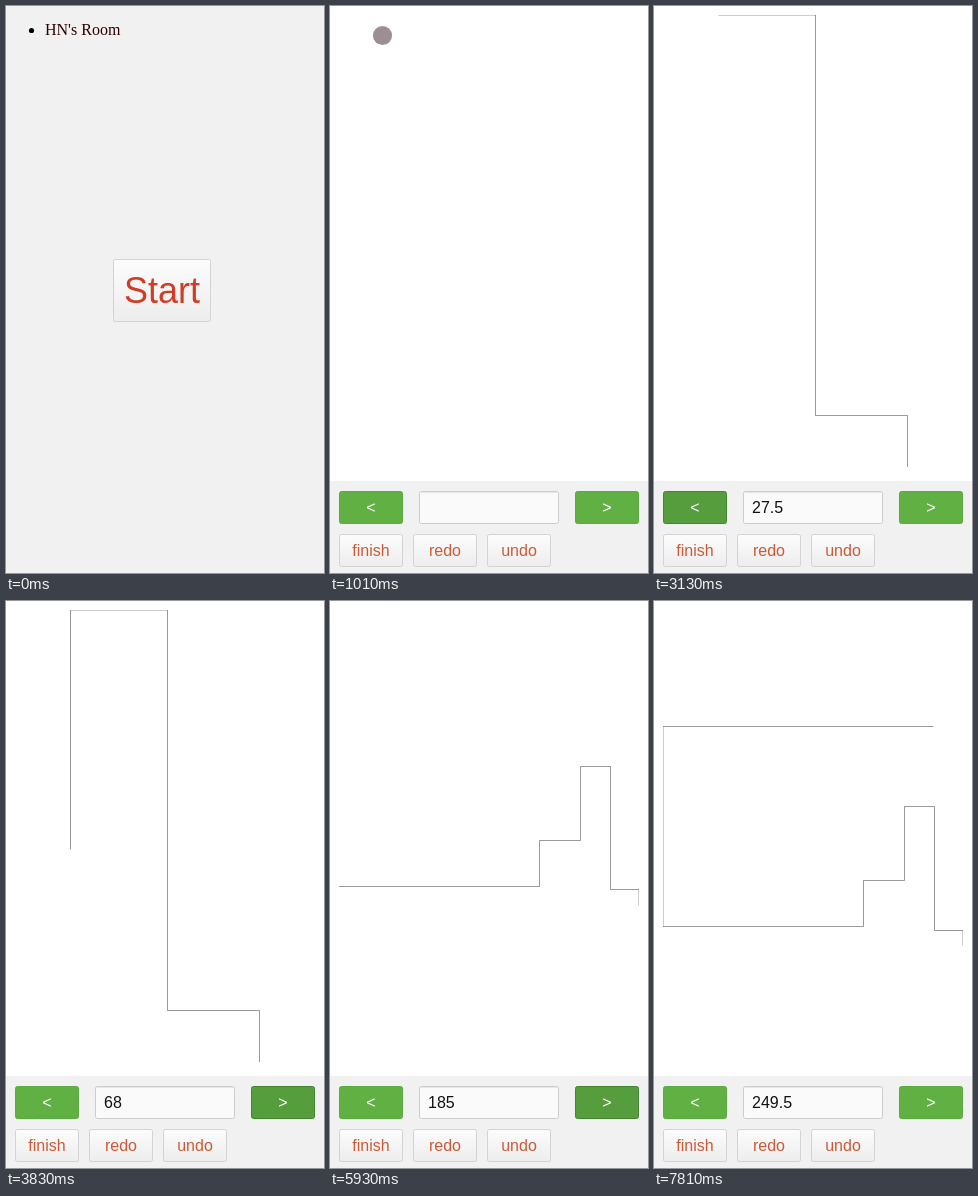
Animation of 318 by 567 pixels, one loop 8 s. Source, as an HTML page:

```html
<!DOCTYPE html>
<html lang="en">
<head>
<meta charset="utf-8">
<title>Wall plan</title>
<style>
  html, body { margin: 0; height: 100%; overflow: hidden; background: #fff; }
  body > svg { display: block; width: 100vw; height: 100vh; }
  text { font: 16px "Liberation Sans", Arial, sans-serif; }
  .mid { text-anchor: middle; }
  .link { font-family: "Liberation Serif", Times, serif; fill: #300000; }
  .light rect { fill: url(#shade); stroke: #d3d3d3; }
  .light text { fill: #cb5a37; }
  .light .big { font-size: 36px; fill: #d03c25; }
  .turn rect { fill: #60b044; stroke: #5cab41; }
  .turn text { fill: #fff; }
  .turn.down rect { fill: #569d3d; stroke: #45852f; }
  #walls { fill: none; stroke: #000; stroke-width: .4; }
</style>
</head>
<body>
<svg viewBox="0 0 318 567">
  <defs>
    <linearGradient id="shade" x2="0" y2="1">
      <stop stop-color="#fcfcfc"/><stop offset="1" stop-color="#ededed"/>
    </linearGradient>
  </defs>
  <g id="home">
    <rect width="318" height="567" fill="#f1f1f1"/>
    <circle cx="25.5" cy="24.5" r="2.6"/>
    <text class="link" x="39" y="29">HN's Room</text>
    <g class="light">
      <rect x="107.5" y="253.5" width="97" height="62" rx="2"/>
      <text class="mid big" x="156" y="297">Start</text>
    </g>
  </g>
  <g id="plan">
    <rect width="318" height="567" fill="#fff"/>
    <svg x="9" y="9" width="300" height="452"><polyline id="walls"/></svg>
    <rect y="475" width="318" height="92" fill="#f1f1f1"/>
    <rect x="89.5" y="485.5" width="139" height="32" rx="2" fill="#fafafa" stroke="#ccc"/>
    <path d="M91 486.5h136" stroke="#e6e6e6"/>
    <text id="value" x="98" y="507" fill="#111"></text>
  </g>
  <circle id="touch" r="9.6" fill="#3c1e28" fill-opacity=".5"/>
</svg>
<script>
const $ = id => document.getElementById(id);

function addButton(x, y, label, kind) {
  const g = document.createElementNS('http://www.w3.org/2000/svg', 'g');
  g.setAttribute('class', kind);
  g.innerHTML = `<rect x="${x + .5}" y="${y + .5}" width="63" height="32" rx="2"/>
    <text class="mid" x="${x + 32}" y="${y + 22}"></text>`;
  g.lastElementChild.textContent = label;
  $('plan').append(g);
  return g;
}
const left = addButton(9, 485, '<', 'turn');
const right = addButton(245, 485, '>', 'turn');
['finish', 'redo', 'undo'].forEach((s, i) => addButton(9 + 74 * i, 528, s, 'light'));

const LOOP = 8000, PLAN_AT = 1010, TOUCH_END = 1090;
const W = 300, H = 452;

// drawn at, button released at, wall length, turn after it, button pressed at
const steps = [
  [1170, 1550, 14.5, '<'],
  [1790, 2270, 26.3, '>', 1550],
  [2410, 2970, 114, '<'],
  [3130, 3670, 27.5, '<'],
  [3830, 4370, 68, '>'],
  [4530, 5070, 38, '<'],
  [5230, 5770, 42.5, '>'],
  [5930, 6470, 185, '>'],
  [6630, 7190, 184.5, '>'],
  [7350, 7810, 249.5, '<']
].map(([at, up, len, turn, down = at]) => ({ at, up, len, turn, down }));

// Crisp pixel centres inside, half-clipped lines on the border
const snap = (v, max) => v < .01 ? 0 : v > max - .01 ? max : Math.floor(v) + .5;

function fitWalls(walls) {
  if (!walls.length) return '';
  let x = 0, y = 0, dx = 0, dy = -1;
  const pts = [[0, 0]];
  for (const { len, turn } of walls) {
    x += dx * len;
    y += dy * len;
    pts.push([x, y]);
    [dx, dy] = turn === '<' ? [dy, -dx] : [-dy, dx];
  }
  const range = i => {
    const v = pts.map(p => p[i]);
    return [Math.min(...v), Math.max(...v)];
  };
  const [x0, x1] = range(0), [y0, y1] = range(1);
  const s = Math.min(W / (x1 - x0), H / (y1 - y0));
  return pts.map(p => [
    snap(W / 2 + (p[0] - (x0 + x1) / 2) * s, W),
    snap(H / 2 + (p[1] - (y0 + y1) / 2) * s, H)
  ]).join(' ');
}

function moveTouch(t) {
  const k = Math.min(8, Math.floor((t - 70) / 77.5)) / 8;
  const e = k * k * (3 - 2 * k);
  $('touch').setAttribute('cx', 213.5 - 161 * e);
  $('touch').setAttribute('cy', 392.5 - 363 * e);
  $('touch').style.display = t >= 70 && t < TOUCH_END ? '' : 'none';
}

function draw(t) {
  const walls = steps.filter(s => t >= s.at);
  const pressed = turn => steps.some(s => s.turn === turn && t >= s.down && t < s.up);
  $('plan').style.display = t < PLAN_AT ? 'none' : '';
  $('walls').setAttribute('points', fitWalls(walls));
  $('value').textContent = walls.length ? walls[walls.length - 1].len : '';
  left.classList.toggle('down', pressed('<'));
  right.classList.toggle('down', pressed('>'));
  moveTouch(t);
}

const start = performance.now();
function tick() {
  draw((performance.now() - start) % LOOP);
  requestAnimationFrame(tick);
}
tick();
</script>
</body>
</html>
```
